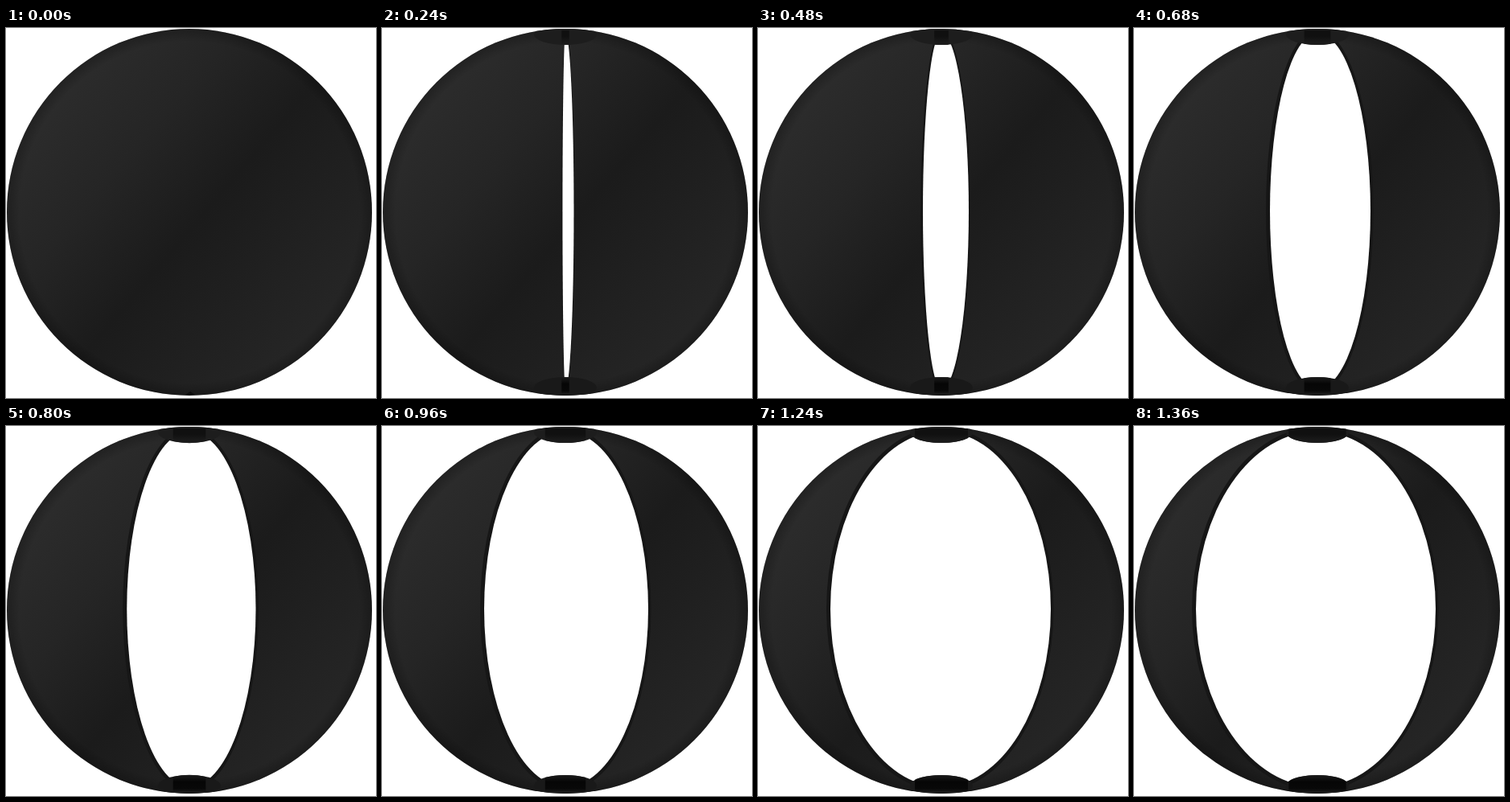
Recreate the animation shown at these times as an HTML page. Size 460 by 460 pixels, loop 1400 ms.

```html
<!DOCTYPE html>
<html lang="en">
<head>
<meta charset="utf-8">
<title>Opening sphere</title>
<style>
html, body { margin: 0; width: 100%; height: 100%; overflow: hidden; background: #fff; }
svg { display: block; width: 100%; height: 100%; }
</style>
</head>
<body>
<svg viewBox="0 0 460 460">
  <defs>
    <linearGradient id="shell" gradientUnits="userSpaceOnUse" x1="70" y1="70" x2="400" y2="350">
      <stop offset="0" stop-color="#2c2c2c"/>
      <stop offset=".28" stop-color="#252525"/>
      <stop offset=".55" stop-color="#1b1b1b"/>
      <stop offset="1" stop-color="#252525"/>
    </linearGradient>
    <radialGradient id="edge">
      <stop offset=".93" stop-color="#000" stop-opacity="0"/>
      <stop offset="1" stop-color="#000" stop-opacity=".25"/>
    </radialGradient>
    <linearGradient id="topCap" gradientUnits="userSpaceOnUse" x1="0" y1="3" x2="0" y2="21">
      <stop offset="0" stop-color="#101010"/>
      <stop offset=".4" stop-color="#101010"/>
      <stop offset="1" stop-color="#1e1e1e"/>
    </linearGradient>
    <linearGradient id="lowCap" gradientUnits="userSpaceOnUse" x1="0" y1="434" x2="0" y2="455">
      <stop offset="0" stop-color="#1c1c1c"/>
      <stop offset=".4" stop-color="#060606"/>
      <stop offset=".8" stop-color="#080808"/>
      <stop offset="1" stop-color="#181818"/>
    </linearGradient>
    <clipPath id="ball"><ellipse cx="228" cy="229" rx="227" ry="228"/></clipPath>
  </defs>
  <ellipse cx="228" cy="229" rx="227" ry="228" fill="url(#shell)"/>
  <ellipse cx="228" cy="229" rx="227" ry="228" fill="url(#edge)"/>
  <path d="M223 456L229 452L235 456Z" fill="#0c0c0c"/>
  <g id="gap" clip-path="url(#ball)">
    <path id="rim" fill="#161616"/>
    <path id="hole" fill="#fff"/>
    <ellipse cx="228" cy="8" rx="39" ry="13" fill="#1d1d1d"/>
    <ellipse cx="228" cy="447" rx="39" ry="13" fill="#191919"/>
    <path id="top" fill="url(#topCap)"/>
    <path id="low" fill="url(#lowCap)"/>
  </g>
</svg>
<script>
const LOOP = 1400, STEP = 40, CX = 228, CY = 227.5;
const steps = [0, 5, 8, 13, 20, 27, 30];
const leftHalf = [0, 10, 23, 59, 101, 138, 151];
const rightHalf = [2, 23, 34, 66, 103, 136, 147];
const el = id => document.getElementById(id);

// Smooth curve through the key values
function curve(vals, k) {
  const last = steps.length - 1;
  let i = 0;
  while (i < last - 1 && k > steps[i + 1]) i++;
  const slope = j => {
    const a = Math.max(j - 1, 0), b = Math.min(j + 1, last);
    return (vals[b] - vals[a]) / (steps[b] - steps[a]);
  };
  const h = steps[i + 1] - steps[i], u = (k - steps[i]) / h, v = 1 - u;
  return vals[i] * (1 + 2 * u) * v * v + vals[i + 1] * u * u * (3 - 2 * u)
    + h * u * v * (slope(i) * v - slope(i + 1) * u);
}

// Two half ellipses sharing the vertical axis
const lens = (l, r, ry) =>
  `M${CX} ${CY - ry}A${r} ${ry} 0 0 1 ${CX} ${CY + ry}A${l} ${ry} 0 0 1 ${CX} ${CY - ry}Z`;

function cap(w, flip) {
  const y = 8 + 13 * Math.sqrt(1 - (w / 39) ** 2);
  const Y = v => flip ? 2 * CY - v : v;
  const base = flip ? 454 : 3;
  return `M${CX - w} ${base}H${CX + w}V${Y(y)}A39 13 0 0 ${flip ? 0 : 1} ${CX - w} ${Y(y)}Z`;
}

function draw(time) {
  const k = Math.max(0, Math.floor(time % LOOP / STEP) - 4);
  el("gap").style.display = k ? "" : "none";
  if (!k) return;
  const l = curve(leftHalf, k), r = curve(rightHalf, k);
  const rim = 1 + Math.min(4, l / 14);
  const w = Math.min(4 + 0.21 * l, 37);
  el("rim").setAttribute("d", lens(l + rim, r + rim * 0.7, 226));
  el("hole").setAttribute("d", lens(l, r, 221));
  el("top").setAttribute("d", cap(w, false));
  el("low").setAttribute("d", cap(w, true));
}

const start = performance.now();
function tick() {
  draw(performance.now() - start);
  requestAnimationFrame(tick);
}
tick();
</script>
</body>
</html>
```
